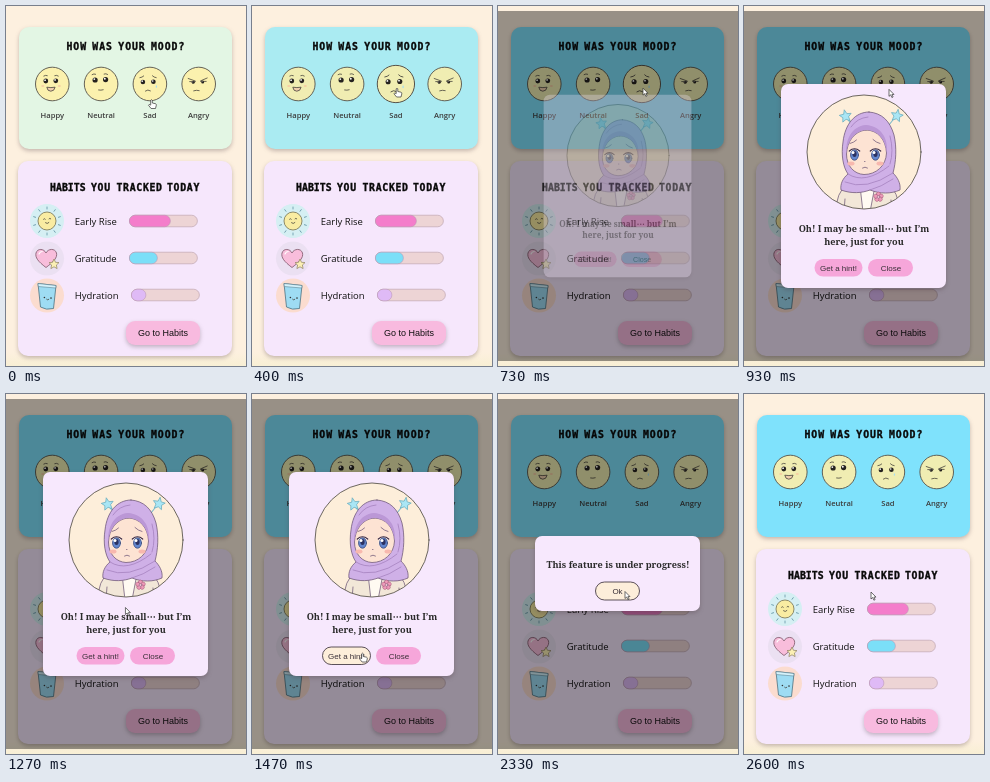
Recreate the animation shown at these times as an HTML page. Size 240 px wide and 360 px high, loop 2.67 s.

```html
<!DOCTYPE html>
<html lang="en">
<head>
<meta charset="utf-8">
<title>Mood and habits</title>
<style>
html, body { margin: 0; width: 100%; height: 100%; overflow: hidden; background: #fdf0df; }
svg { display: block; width: 100%; height: 100%; }
.pixel { font: bold 9.8px "DejaVu Sans Mono", monospace; letter-spacing: .95px; fill: #0a0a0a; stroke: #0a0a0a; stroke-width: .35; stroke-linejoin: miter; }
.mood { font: 600 7.6px "Open Sans", sans-serif; fill: #3c3c3c; text-anchor: middle; }
.habit { font: 500 9.5px "Open Sans", sans-serif; fill: #111; }
.btn { font: 8px "Liberation Sans", Arial, sans-serif; fill: #3a3038; text-anchor: middle; }
.big { font-size: 9px; fill: #111; }
.say { font: 600 9.15px "Noto Serif", serif; fill: #2a2a2a; text-anchor: middle; }
.ink { fill: none; stroke: #3d3a35; stroke-width: .75; stroke-linecap: round; stroke-linejoin: round; }
.shade { filter: drop-shadow(0 2px 2px rgba(70, 50, 60, .3)); }
</style>
</head>
<body>
<svg viewBox="0 0 240 360" preserveAspectRatio="none">
  <defs>
    <clipPath id="round"><circle cx="120" cy="146" r="56.5"/></clipPath>
    <linearGradient id="foot" x2="0" y2="1"><stop stop-color="#fdf0df"/><stop offset="1" stop-color="#f8efd4"/></linearGradient>
    <path id="star" d="M0-5 1.5-1.7 5-1.4 2.4 1 3.1 4.6 0 2.8-3.1 4.6-2.4 1-5-1.4-1.5-1.7Z" stroke-linejoin="round"/>
  </defs>

  <rect width="240" height="360" fill="#fdf0df"/>
  <rect y="346" width="240" height="14" fill="url(#foot)"/>

  <rect id="card" class="shade" x="13" y="21" width="213" height="122" rx="10"/>
  <g class="pixel">
    <text y="44.3"><tspan x="60.5">HOW</tspan><tspan x="86.3">WAS</tspan><tspan x="112.3">YOUR</tspan><tspan x="145">MOOD?</tspan></text>
  </g>
  <g id="faces"></g>

  <rect class="shade" x="12" y="155" width="214" height="195" rx="10" fill="#f6e7fc"/>
  <g class="pixel" style="letter-spacing:.7px">
    <text y="184.8"><tspan x="44" style="letter-spacing:.05px">HABITS</tspan><tspan x="85">YOU</tspan><tspan x="110.5">TRACKED</tspan><tspan x="161">TODAY</tspan></text>
  </g>
  <g id="habits"></g>

  <g transform="translate(41 215)">
    <circle r="17" fill="#d5eff3"/>
    <g id="rays" stroke="#6f9fae" stroke-width=".9" stroke-linecap="round"></g>
    <circle r="9" fill="#f9eca2" stroke="#77704f" stroke-width=".8"/>
    <path class="ink" d="M-3.500-1.800q.9-1.200 1.800 0M2-2.200q.9-1.200 1.800 0M-1.500 1.800q1.800 1.600 3.400-.2"/>
  </g>
  <g transform="translate(41 252.5)">
    <circle r="17" fill="#ebe0f2"/>
    <path d="M-1 9C-9 3-12-1-11-5.500-9.500-10.500-3-10-1-5.500 1-10 8-10.500 9.500-5.500 10.500-1 7 3-1 9Z" fill="#f8bddb" stroke="#7d5568" stroke-width=".8"/>
    <path d="M-8-4.500q1-2.500 3.200-2.500" fill="none" stroke="#fff" stroke-width="1.2" stroke-linecap="round"/>
    <use href="#star" transform="translate(7 5.5)" fill="#fbefb4" stroke="#8e8160" stroke-width=".7"/>
  </g>
  <g transform="translate(41 289.5)">
    <circle r="17" fill="#fbdccf"/>
    <path d="M-9-12 9-10 6.500 13Q-1 15-6.500 11.500Z" fill="#9edcf3" stroke="#4d7180" stroke-width=".8" stroke-linejoin="round"/>
    <path d="M-9-12 9-10 8.700-7.500-8.700-9Z" fill="#d4f2fb" stroke="#4d7180" stroke-width=".5"/>
    <circle cx="-2.600" cy="2" r=".8" fill="#333"/><circle cx="4" cy="2.600" r=".8" fill="#333"/>
    <path class="ink" d="M-.4 3.800q1.100 1.300 2.200.1"/>
  </g>

  <rect class="shade" x="120" y="315" width="74" height="24" rx="9" fill="#f8badf"/>
  <text class="btn big" x="157" y="330">Go to Habits</text>

  <rect id="dim" y="5" width="240" height="350" fill="#000" opacity=".4"/>

  <g id="hintBox">
    <rect class="shade" x="37" y="78" width="165" height="204" rx="7" fill="#f7e8fd"/>
    <circle cx="120" cy="146" r="57" fill="#fdeeda"/>
    <g clip-path="url(#round)" stroke="#6d5676" stroke-width=".75" stroke-linejoin="round" stroke-linecap="round">
      <path d="M108 119 102 111M145 119 152 110" fill="none" stroke="#84bccb" stroke-width="1.2"/>
      <g fill="#a9e6f5" stroke="#6aaebf" stroke-width=".6">
        <use href="#star" transform="translate(101.500 110) rotate(-10) scale(1.2)"/>
        <use href="#star" transform="translate(153 109.500) rotate(12) scale(1.2)"/>
      </g>
      <path d="M92 206Q92 186 103 179H144Q154 184 156 206Z" fill="#f2e7d8"/>
      <path d="M116 180 119 206H126L131 180Z" fill="#fffaf2"/>
      <path d="M100 206 101 193M148 206 147 194" fill="none"/>
      <path d="M125 106C111 106 101 118 99 136 97 149 99 161 104 168 99 172 96 178 97 184 108 188 118 187 126 184 136 188 147 188 156 184 157 177 153 171 149 167 152 156 153 142 150 129 146 115 138 107 125 106Z" fill="#cfb0e7"/>
      <path d="M122 124C110 125 103 136 102.500 148 102.500 160 110 168 120 168.500 132 168.500 142 160 142.500 147 142 134 134 124 122 124Z" fill="#fde3d3"/>
      <path d="M122 124C110 125 103 136 102.500 148 101 135 107 120 122 119 137 120 145 133 142.500 147 142 134 134 124 122 124Z" fill="#bb97d6" stroke="none"/>
      <path d="M104 168Q121 179 145 160M101 176Q122 185 149 167M126 184Q137 181 149 173M107 121Q113 112 124 111M146 130Q150 145 146 158" fill="none" stroke="#a37fbc"/>
      <g fill="#f8b8ae" stroke="none"><ellipse cx="107" cy="157.500" rx="3.500" ry="2"/><ellipse cx="136" cy="157.500" rx="3.500" ry="2"/></g>
      <g id="eyes"></g>
      <path d="M106 137.500Q110 136.500 112.500 134M129 133.500Q132 136.500 136 137.500M118.500 162Q121 160.200 123.500 162M120.500 155.500h.5" fill="none"/>
      <g id="rose" fill="#ee9ab9" stroke="#a45a79" stroke-width=".5"></g>
      <circle cx="134.500" cy="191" r="1.300" fill="#f8c8d7" stroke-width=".4"/>
    </g>
    <circle cx="120" cy="146" r="57" class="ink"/>
    <text class="say" x="120" y="225.500">Oh! I may be small⋯ but I’m</text>
    <text class="say" x="120" y="238.500">here, just for you</text>
    <rect id="hintBtn" x="70.500" y="253" width="48" height="17.500" rx="8.700"/>
    <text class="btn" x="94.500" y="264.500">Get a hint!</text>
    <rect x="124" y="253" width="45" height="17.500" rx="8.700" fill="#f6a6da"/>
    <text class="btn" x="147" y="264.500">Close</text>
  </g>

  <g id="okBox">
    <rect class="shade" x="37" y="142" width="165" height="75" rx="7" fill="#f7e8fd"/>
    <text class="say" x="120" y="173.500">This feature is under progress!</text>
    <rect id="okBtn" x="97.500" y="188" width="44" height="18" rx="9"/>
    <text class="btn" x="119.500" y="199.700">Ok</text>
  </g>

  <g id="cursor" stroke="#333" stroke-width=".7" stroke-linejoin="round" fill="#fff">
    <path id="arrow" d="M0 0V7L1.700 5.500 2.900 8.200 4.100 7.600 2.900 5.100H5Z"/>
    <path id="hand" d="M-.8 5V.8Q0-.5.8.8V3.500L4 4.200Q5 4.500 4.800 5.800L4 9H-.4L-3 5.800Q-2.800 4.200-.8 5.600Z"/>
  </g>
</svg>
<script>
const LOOP = 2670, STEP = 1000 / 15;
const $ = id => document.getElementById(id);
const clamp = v => Math.max(0, Math.min(1, v));
const ease = (t, a, b) => { const p = clamp((t - a) / (b - a)); return p * p * (3 - 2 * p); };
const mix = (a, b, p) => a + (b - a) * p;
const blend = (a, b, p) => `rgb(${a.map((v, i) => Math.round(mix(v, b[i], p)))})`;
const show = (id, on) => $(id).setAttribute('visibility', on ? 'visible' : 'hidden');

const eye = (x, y, r) =>
  `<circle cx="${x}" cy="${y}" r="${r}" fill="#25221f"/><circle cx="${x - r * .3}" cy="${y - r * .35}" r="${r * .36}" fill="#fff"/>`;
const line = d => `<path class="ink" d="${d}"/>`;
const blush = (x, y) => `<ellipse cx="${x}" cy="${y}" rx="1.6" ry=".9" fill="#f5cfa4"/>`;

const moods = [
  ['Happy', eye(-6.500, -3, 2.4) + eye(3.500, -3.2, 2.4) + blush(-9.500, 2) + blush(7, 2) +
    line('M-8.500-8q1.800-1.200 3.500-.4M2.500-8.400q1.800-.8 3.500.4') +
    '<path d="M-5.500 3.200Q-1.500 4 2.800 3.200 2 7.200-1.500 7.200-5 7.200-5.500 3.200Z" fill="#f0cfae" stroke="#3d3a35" stroke-width=".75"/>'],
  ['Neutral', eye(-6, -4, 2.6) + eye(4.500, -4.400, 2.6) +
    line('M-9-9.400q1.800-1.200 3.500-.4M3-10q1.800-.8 3.500.4M-2.500 6q2.300.5 4.600-.2')],
  ['Sad', eye(-7, -2, 2.3) + eye(3.500, -2.200, 2.3) +
    line('M-10-6.300q2.400-.3 3.800-1.700M2.500-8.200q1.400 1.600 3.800 1.900M-4.500 7q2.400-2 5-.2') +
    '<path d="M6.500 1q1.400 2.400 0 2.800-1.400-.4 0-2.800" fill="#a9def0"/>'],
  ['Angry', eye(-5.500, -1.800, 1.5) + eye(4, -2, 1.5) +
    line('M-10.500-5.500-3.500-3M8.500-6 2-3.200M-9-2.400h5.500M2-2.600h5.500M-5 6.800q2.800-1 5.500-.2')]
];
$('faces').innerHTML = moods.map(([name, parts], i) => {
  const x = 46.3 + i * 48.8;
  return `<g id="${name}" transform="translate(${x} 78)"><circle class="skin" r="16.8" stroke="#55524a" stroke-width=".9"/>${parts}</g>` +
    `<text class="mood" x="${x}" y="112">${name}</text>`;
}).join('');

const habits = [
  ['Early Rise', 123, 215, 41, '#f47dcb'],
  ['Gratitude', 123, 252, 28, '#7bdff8'],
  ['Hydration', 125, 289, 14.5, '#dfbaf6']
];
$('habits').innerHTML = habits.map(([name, x, y, w, color]) => {
  const bar = (len, look) => `<rect x="${x + .4}" y="${y - 5.8}" width="${len}" height="11.6" rx="5.8" ${look}/>`;
  return `<text class="habit" x="68.7" y="${y + 4}">${name}</text>` +
    bar(68, 'fill="#edd4d5" stroke="#b79ca6" stroke-width=".6"') +
    bar(w, `fill="${color}" stroke="#b591b0" stroke-width=".5"`);
}).join('');

const ring = (n, draw) => Array.from({ length: n }, (_, i) => draw(i * 360 / n)).join('');
$('rays').innerHTML = ring(10, a => `<path d="M0-12V-14" transform="rotate(${a})"/>`);
$('rose').innerHTML = ring(5, a => `<circle cy="-2.8" r="2.1" transform="translate(134.500 191) rotate(${a})"/>`);
$('eyes').innerHTML = [110.5, 131.5].map(x =>
  `<ellipse cx="${x}" cy="148.500" rx="4.8" ry="5.8" fill="#fff" stroke="none"/>` +
  `<ellipse cx="${x}" cy="149" rx="4" ry="5.2" fill="#6387cf" stroke="#38436f"/>` +
  `<ellipse cx="${x}" cy="148" rx="2.1" ry="3" fill="#2b3262" stroke="none"/>` +
  `<circle cx="${x - 1.5}" cy="146.500" r="1.500" fill="#fff" stroke="none"/>` +
  `<path d="M${x - 5.2} 145Q${x} 140.500 ${x + 5.2} 145" fill="none" stroke="#3d2d48" stroke-width="1.2"/>`).join('');

// Pointer stops: time, x, y
const stops = [[0, 145.5, 93.5], [300, 145, 82], [670, 145, 82], [1000, 145, 83.5],
  [1400, 110.5, 259], [1750, 110.5, 259], [2200, 127, 197.5], [2500, 127, 197.5], [2600, 127, 198]];
function pointer(t) {
  const i = stops.findLastIndex(s => s[0] <= t), a = stops[i], b = stops[i + 1] || a;
  const p = a === b ? 0 : ease(t, a[0], b[0]);
  return [mix(a[1], b[1], p), mix(a[2], b[2], p)];
}

function hover(id, on) {
  $(id).setAttribute('fill', on ? '#fdeeda' : '#f6a6da');
  $(id).setAttribute('stroke', on ? '#4a3f48' : 'none');
  $(id).setAttribute('stroke-width', .9);
}
function pop(id, p, cy) {
  const s = mix(.85, 1, p);
  $(id).setAttribute('opacity', p);
  $(id).setAttribute('transform', `translate(${120 * (1 - s)} ${cy * (1 - s)}) scale(${s})`);
}

const OPEN = 730, SWAP = 1790, SHUT = 2460;
function draw(t) {
  const tint = ease(t, 70, 670);
  $('card').setAttribute('fill', blend([227, 246, 228], [127, 226, 252], tint));
  const skin = blend([251, 241, 174], [240, 237, 178], ease(t, 70, 400));
  document.querySelectorAll('.skin').forEach(c => c.setAttribute('fill', skin));
  const grow = 1 + .11 * (ease(t, 60, 300) - ease(t, OPEN, 900));
  $('Sad').setAttribute('transform', `translate(143.9 78) scale(${grow})`);

  show('dim', t >= OPEN && t < SHUT);
  show('hintBox', t >= OPEN && t < SWAP);
  show('okBox', t >= SWAP && t < SHUT);
  pop('hintBox', ease(t, OPEN - 70, 860), 180);
  pop('okBox', ease(t, SWAP - 70, SWAP + 130), 180);

  const [x, y] = pointer(t);
  const onHint = t < SWAP && x < 118 && y > 253;
  hover('hintBtn', onHint);
  hover('okBtn', t > SWAP && y < 206 && y > 188);
  $('cursor').setAttribute('transform', `translate(${x} ${y})`);
  const hand = t < OPEN || onHint;
  show('hand', hand);
  show('arrow', !hand);
}

const start = performance.now();
function tick() {
  const t = (performance.now() - start) % LOOP;
  draw(Math.floor((t + 6) / STEP) * STEP);
  requestAnimationFrame(tick);
}
draw(0);
tick();
</script>
</body>
</html>
```
